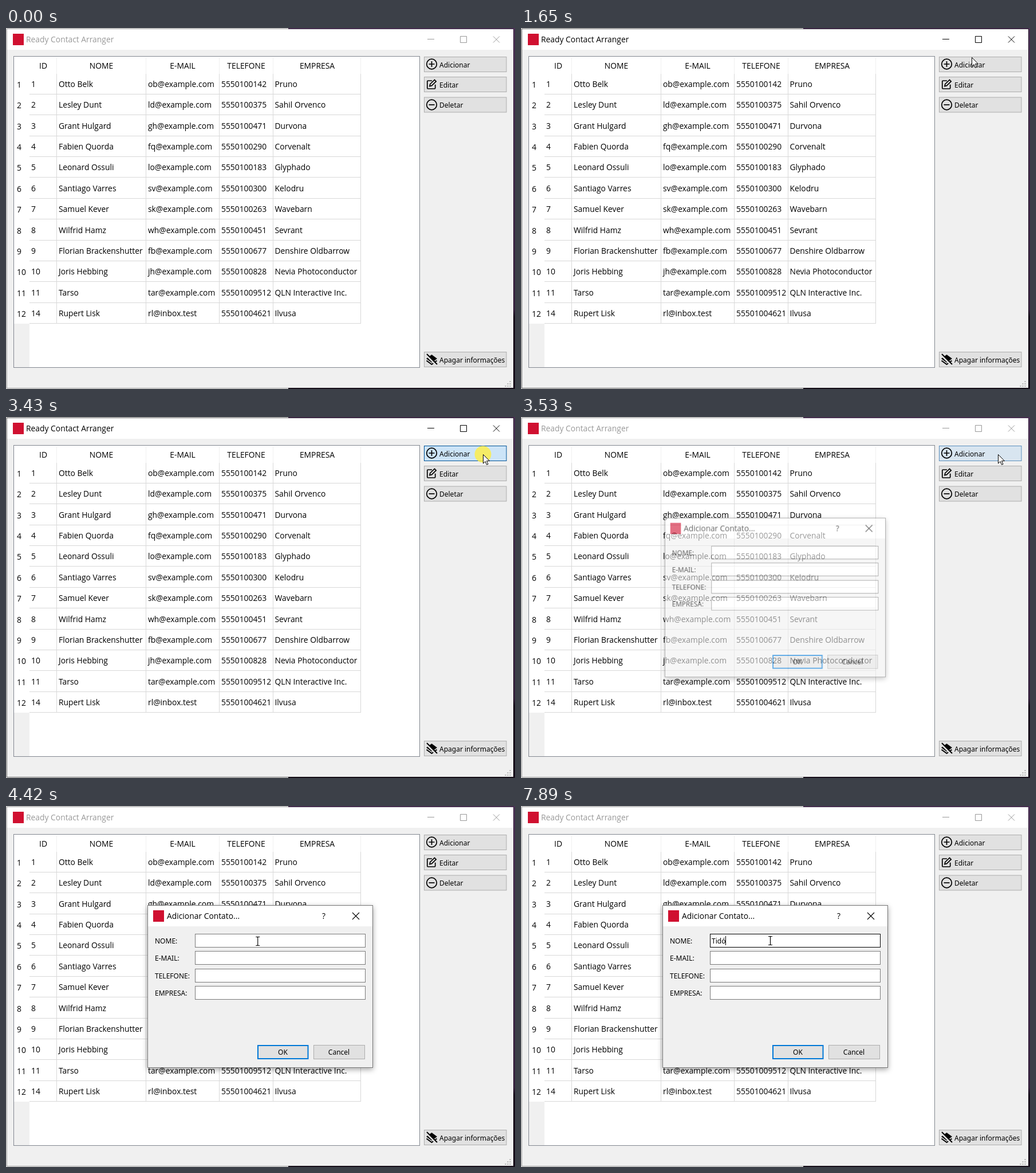
An HTML page that plays this animation: 889x630 px, repeating every 8000 ms.

```html
<!DOCTYPE html>
<html lang="pt">
<head>
<meta charset="utf-8">
<title>Ready Contact Arranger</title>
<style>
html, body { margin: 0; width: 100%; height: 100%; overflow: hidden; background: #d5d5d5; }
svg { display: block; width: 100vw; height: 100vh; color: #000; }
text { font: 13.85px "Open Sans", "Noto Sans", sans-serif; fill: currentColor; white-space: pre; }
.small text, text.small { font: 12px "Noto Sans", "Open Sans", sans-serif; }
.mid { text-anchor: middle; }
.line { fill: none; stroke: currentColor; }
.button { fill: #e1e1e1; stroke: #adadad; }
.field { fill: #fff; stroke: #7a7a7a; }

.anim { animation: 8s linear infinite; }
.hard { animation: 8s step-end infinite; }
#active { animation-name: active; }
#frame { animation-name: frame; }
#add { animation-name: add; }
#tip { animation-name: tip; }
#dialog { animation-name: dialog; transform-origin: 444px 315px; }
#focus { animation-name: focus; }
#pointer { animation-name: pointer; }
#arrow { animation-name: arrow; }
#beam { animation-name: beam; }
#glow { animation-name: glow; }
#caret { animation-name: caret; }
#key1 { animation-name: key1; }
#key2 { animation-name: key2; }
#key3 { animation-name: key3; }
#key4 { animation-name: key4; }

@keyframes active { 0% { opacity: 0 } 11.875% { opacity: 1 } 43%, 100% { opacity: 0 } }
@keyframes frame { 0% { stroke-opacity: .22 } 11.875% { stroke-opacity: .5 } 43%, 100% { stroke-opacity: .22 } }
@keyframes add {
  0%, 21.25% { fill: #e1e1e1; stroke: #adadad }
  21.5%, 42.25% { fill: #e5f1fb; stroke: #0078d7 }
  42.375%, 43.25% { fill: #cce4f7; stroke: #005499 }
  44.125% { fill: #d8e5f0; stroke: #5a8fbd }
  46%, 100% { fill: #e1e1e1; stroke: #adadad }
}
@keyframes tip { 0%, 31.25% { opacity: 0 } 31.875% { opacity: .5 } 32.5%, 42.25% { opacity: 1 } 42.375%, 100% { opacity: 0 } }
@keyframes dialog {
  0%, 43% { opacity: 0; transform: scale(.94) }
  44.125% { opacity: .6; transform: scale(.98) }
  46%, 100% { opacity: 1; transform: none }
}
@keyframes focus { 0% { opacity: 0 } 56.75%, 100% { opacity: 1 } }
@keyframes pointer {
  0%, 1.74% { transform: translate(920px, 150px) }
  1.75% { transform: translate(850px, 196px) }
  2.55% { transform: translate(760px, 280px) }
  3.375%, 5.5% { transform: translate(670px, 454px); animation-timing-function: ease-in-out }
  12.5%, 16.5% { transform: translate(681px, 17px); animation-timing-function: ease-in-out }
  23.125%, 41.6% { transform: translate(831px, 65px) }
  41.75%, 47.5% { transform: translate(833px, 65px); animation-timing-function: ease-in-out }
  51.5%, 52.1% { transform: translate(510px, 251px); animation-timing-function: ease-out }
  56%, 100% { transform: translate(435px, 235px) }
}
@keyframes arrow { 0% { opacity: 0 } 1.75% { opacity: 1 } 53.25%, 100% { opacity: 0 } }
@keyframes beam { 0% { opacity: 0 } 53.25%, 100% { opacity: 1 } }
@keyframes glow {
  0% { opacity: 0 } 11.875% { opacity: .85 } 13.25% { opacity: 0 }
  41.75% { opacity: .85 } 43.5% { opacity: 0 }
  56.25% { opacity: .85 } 59.125%, 100% { opacity: 0 }
}
@keyframes caret {
  0% { opacity: 0; transform: none }
  56.75% { opacity: 1; transform: none }
  63.25% { opacity: 0; transform: none }
  69.625% { opacity: 1; transform: none }
  73% { opacity: 1; transform: translateX(7px) }
  79% { opacity: 1; transform: translateX(10px) }
  86.375% { opacity: 0; transform: translateX(10px) }
  88.875% { opacity: 1; transform: translateX(17px) }
  96.25% { opacity: 0; transform: translateX(17px) }
  98.625%, 100% { opacity: 1; transform: translateX(24px) }
}
@keyframes key1 { 0% { opacity: 0 } 73%, 100% { opacity: 1 } }
@keyframes key2 { 0% { opacity: 0 } 79%, 100% { opacity: 1 } }
@keyframes key3 { 0% { opacity: 0 } 88.875%, 100% { opacity: 1 } }
@keyframes key4 { 0% { opacity: 0 } 98.625%, 100% { opacity: 1 } }
</style>
</head>
<body>
<svg viewBox="0 0 889 630">
  <defs>
    <linearGradient id="desk" x2="0" y2="1">
      <stop offset="0" stop-color="#4d3357"/><stop offset=".78" stop-color="#3a2442"/><stop offset=".8" stop-color="#1a111e"/>
    </linearGradient>
    <filter id="shadow" x="-10%" y="-10%" width="120%" height="125%">
      <feDropShadow dx="0" dy="3" stdDeviation="5" flood-opacity=".35"/>
    </filter>
    <g id="titlebar">
      <text x="35" y="25">Ready Contact Arranger</text>
      <path class="line" d="M736 19.5h12M793.5 14.5h11v11h-11zM851 14.5l11 11m0-11l-11 11"/>
    </g>
  </defs>

  <rect x="493" width="396" height="630" fill="url(#desk)"/>
  <rect x="2" y="2" width="884" height="626" fill="#f0f0f0"/>
  <rect x="2" y="2" width="884" height="36" fill="#fff"/>
  <rect id="frame" class="hard" x="1.5" y="1.5" width="885" height="627" fill="none" stroke="#000"/>
  <rect x="12" y="10" width="19" height="20" fill="#d01030"/>
  <use href="#titlebar" color="#999"/>
  <g id="active" class="hard">
    <rect x="34" y="8" width="840" height="24" fill="#fff"/>
    <use href="#titlebar"/>
  </g>

  <rect x="13.5" y="49.5" width="709" height="543" fill="#fff" stroke="#828790"/>
  <rect x="14" y="516" width="27" height="76" fill="#f0f0f0"/>
  <g id="table"></g>

  <g class="small">
    <rect id="add" class="button anim" x="730.5" y="50.5" width="143.5" height="26"/>
    <rect class="button" x="730.5" y="85.5" width="143.5" height="26"/>
    <rect class="button" x="730.5" y="121" width="143.5" height="26"/>
    <rect class="button" x="730.5" y="565.5" width="143.5" height="26"/>
    <text x="757" y="68.5">Adicionar</text>
    <text x="757" y="104">Editar</text>
    <text x="757" y="139">Deletar</text>
    <text x="757" y="584">Apagar informações</text>
    <g class="line" stroke-width="1.7">
      <circle cx="743.5" cy="63" r="8.8"/>
      <path d="M738.5 63h10m-5-5v10"/>
      <circle cx="743.5" cy="134" r="8.8"/>
      <path d="M738.5 134h10"/>
      <path d="M744 92h-7q-1.2 0-1.2 1.2v11.6q0 1.2 1.2 1.2h11.5q1.2 0 1.2-1.2v-6M740 101.5l.8-3.5 7.7-7.5 2.7 2.7-7.7 7.5z"/>
    </g>
    <path d="M743.5 570l9.5 7-9.5 7-9.5-7z"/>
    <path d="M734.5 580.5l9 6.5 9-6.5" class="line" stroke-width="2"/>
    <path d="M734 570l18 18" stroke="#e1e1e1" stroke-width="4.5"/>
    <path d="M735 569l18 18" class="line" stroke-width="2"/>
  </g>
  <path d="M880.5 616v2m0 2v2m0 2v2M876.5 620v2m0 2v2M872.5 624v2" stroke="#b0b0b0" stroke-width="2"/>

  <g id="tip" class="anim">
    <rect x="835" y="83" width="80" height="24" fill="#000" opacity=".15"/>
    <rect x="832.5" y="80.5" width="80" height="23" fill="#fff" stroke="#777"/>
    <text x="838" y="97" color="#575757">Adicionar</text>
  </g>

  <g id="dialog" class="anim">
    <rect x="247.5" y="173.5" width="393" height="283" fill="#f0f0f0" stroke="#777" filter="url(#shadow)"/>
    <rect x="248" y="174" width="392" height="36" fill="#fff"/>
    <rect x="257" y="182" width="19" height="20" fill="#d01030"/>
    <text x="281" y="197">Adicionar Contato...</text>
    <text class="mid" x="555" y="197">?</text>
    <path class="line" d="M605 186l12 12m0-12l-12 12" stroke-width="1.1"/>
    <g id="form" class="small"></g>
    <rect x="440" y="418" width="87.5" height="23" fill="#e1e1e1" stroke="#0078d7" stroke-width="2"/>
    <rect class="button" x="537.5" y="417.5" width="89" height="24"/>
    <text class="small mid" x="483.5" y="434">OK</text>
    <text class="small mid" x="581.5" y="434">Cancel</text>
  </g>
  <rect id="focus" class="line hard" x="330.5" y="223.5" width="297" height="23"/>
  <text class="small" x="333" y="240"><tspan id="key1" class="hard">T</tspan><tspan id="key2" class="hard">i</tspan><tspan id="key3" class="hard">d</tspan><tspan id="key4" class="hard">ó</tspan></text>
  <path id="caret" class="line hard" d="M333.5 227v16"/>

  <g id="pointer" class="anim">
    <circle id="glow" class="hard" r="14.5" fill="#fdee4c"/>
    <path id="arrow" class="hard" d="M.5.5v15.5l3.6-3.4 2.5 5.7 2.4-1-2.5-5.6h5z" fill="#fff" stroke="#000"/>
    <path id="beam" class="line hard" d="M-3-7.5h2.5l.5.5.5-.5H4M.5-7v14M-3 7.5h2.5l.5-.5.5.5H4" stroke-width="1.2"/>
  </g>
</svg>
<script>
const columns = [44, 92, 248, 376, 469.5];
const edges = [88.5, 244.5, 372.5, 466.5, 619.5];
const headings = { ID: 65, NOME: 166.5, 'E-MAIL': 308.5, TELEFONE: 419.5, EMPRESA: 543.5 };
const rowHeight = 36.36;
const contacts = [
  '1|Otto Belk|ob@example.com|5550100142|Pruno',
  '2|Lesley Dunt|ld@example.com|5550100375|Sahil Orvenco',
  '3|Grant Hulgard|gh@example.com|5550100471|Durvona',
  '4|Fabien Quorda|fq@example.com|5550100290|Corvenalt',
  '5|Leonard Ossuli|lo@example.com|5550100183|Glyphado',
  '6|Santiago Varres|sv@example.com|5550100300|Kelodru',
  '7|Samuel Kever|sk@example.com|5550100263|Wavebarn',
  '8|Wilfrid Hamz|wh@example.com|5550100451|Sevrant',
  '9|Florian Brackenshutter|fb@example.com|5550100677|Denshire Oldbarrow',
  '10|Joris Hebbing|jh@example.com|5550100828|Nevia Photoconductor',
  '11|Tarso|tar@example.com|55501009512|QLN Interactive Inc.',
  '14|Rupert Lisk|rl@inbox.test|55501004621|Ilvusa',
];

const label = (x, y, content, cls = '') => `<text class="${cls}" x="${x}" y="${y}">${content}</text>`;
const rule = (d, stroke = '#d8d8d8') => `<path d="${d}" stroke="${stroke}"/>`;

let rows = edges.map(x => rule(`M${x} 52v28`, '#f0f0f0') + rule(`M${x} 80v436`)).join('');
for (const name in headings) rows += label(headings[name], 70.5, name, 'mid');
contacts.forEach((contact, i) => {
  const y = 103 + i * rowHeight;
  rows += rule(`M41 ${Math.floor(115.5 + i * rowHeight) + 0.5}h579`) + label(19, y + 1, i + 1);
  contact.split('|').forEach((cell, c) => rows += label(columns[c], y, cell));
});
document.getElementById('table').innerHTML = rows;

document.getElementById('form').innerHTML = ['NOME:', 'E-MAIL:', 'TELEFONE:', 'EMPRESA:'].map((name, i) =>
  `<rect class="field" x="330.5" y="${Math.round(223 + i * 30.4) + 0.5}" width="297" height="23"/>` +
  label(260, 240 + i * 30.4, name)).join('');
</script>
</body>
</html>
```
